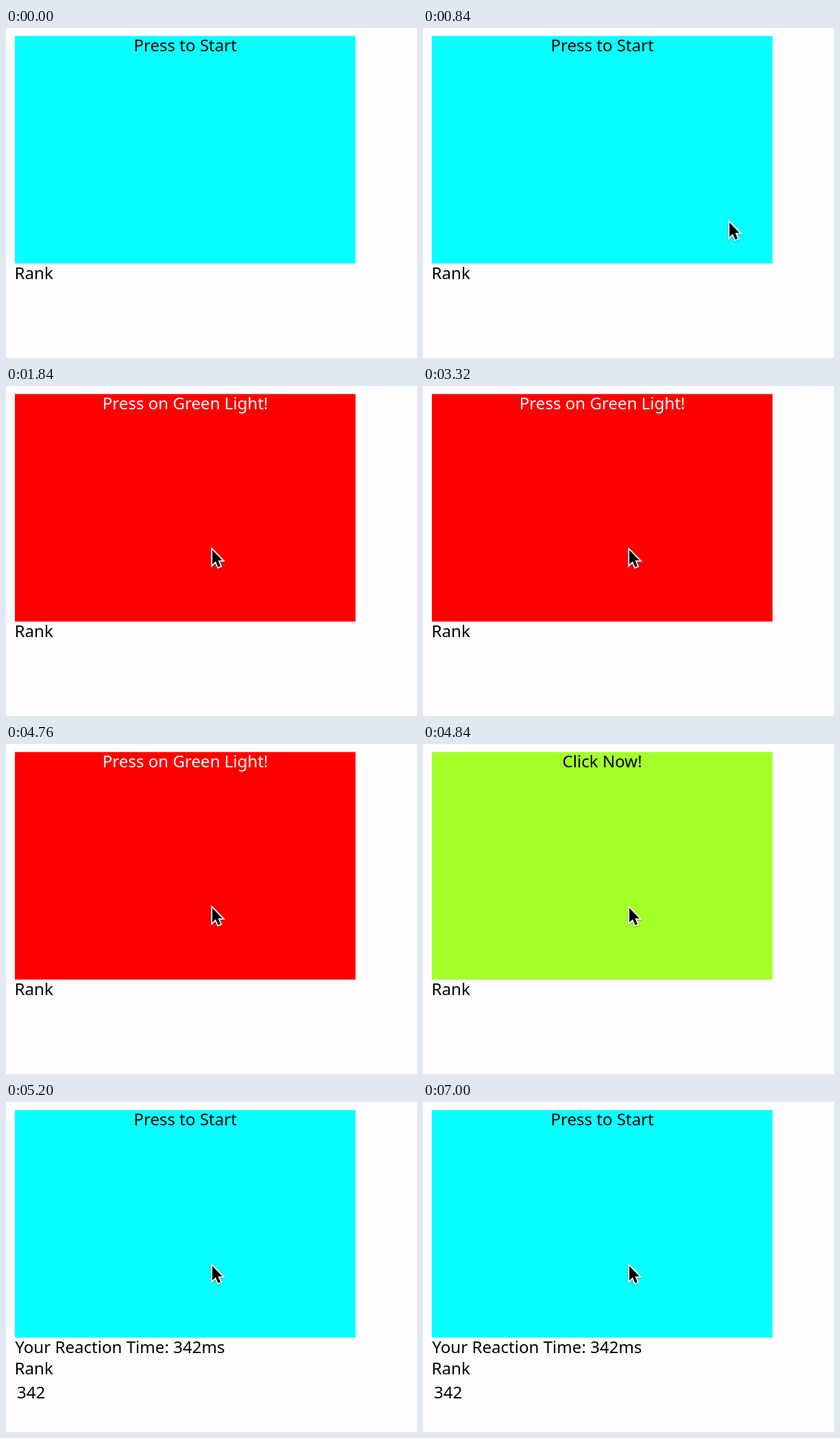
An HTML page for the animation above (7280 ms loop, 600 by 481 pixels).

```html
<!DOCTYPE html>
<html lang="en">
<head>
<meta charset="utf-8">
<title>Reaction test</title>
<style>
  html, body { margin: 0; width: 100%; height: 100%; overflow: hidden; background: #fffdff; }
  svg { display: block; width: 600px; height: 481px; }
  text { font: 24.1px "Noto Sans", sans-serif; }
  .title { text-anchor: middle; }

  .panel, .idle, .wait, .go, .before, .after { animation: 7280ms step-end infinite; }
  .panel { animation-name: panel; }
  .idle { animation-name: idle; }
  .wait { animation-name: wait; }
  .go { animation-name: go; }
  .before { animation-name: before; }
  .after { animation-name: after; }
  .cursor { animation: move 7280ms linear infinite, appear 7280ms step-end infinite; }

  /* 1840 ms = 25.2747%, 4840 ms = 66.4835%, 5200 ms = 71.4286% */
  @keyframes panel {
    0%, 71.4286% { fill: #08ffff; }
    25.2747% { fill: #ff0000; }
    66.4835% { fill: #a4ff28; }
  }
  @keyframes idle {
    0%, 71.4286% { visibility: visible; }
    25.2747% { visibility: hidden; }
  }
  @keyframes wait {
    0%, 66.4835% { visibility: hidden; }
    25.2747% { visibility: visible; }
  }
  @keyframes go {
    0%, 71.4286% { visibility: hidden; }
    66.4835% { visibility: visible; }
  }
  @keyframes before {
    0% { visibility: visible; }
    71.4286% { visibility: hidden; }
  }
  @keyframes after {
    0% { visibility: hidden; }
    71.4286% { visibility: visible; }
  }
  /* 760 ms = 10.4396%, 1160 ms = 15.9341% */
  @keyframes appear {
    0% { visibility: hidden; }
    10.4396% { visibility: visible; }
  }
  @keyframes move {
    0%, 10.4396% { transform: translate(571px, 321px); animation-timing-function: cubic-bezier(.2, .5, .4, 1); }
    15.9341%, 100% { transform: translate(301px, 239px); }
  }
</style>
</head>
<body>
<svg viewBox="0 0 600 481">
  <rect class="panel" x="13" y="11.7" width="497.3" height="331.7"/>
  <text class="title idle" x="261.7" y="34">Press to Start</text>
  <text class="title wait" x="261.7" y="34" fill="#fff">Press on Green Light!</text>
  <text class="title go" x="261.7" y="34">Click Now!</text>
  <text class="before" x="12.6" y="365.5">Rank</text>
  <g class="after">
    <text x="13.3" y="365.5">Your Reaction Time: 342ms</text>
    <text x="12.6" y="397">Rank</text>
    <text x="16" y="431.5">342</text>
  </g>
  <g class="cursor">
    <path d="M.2 0V21.3L5 16.5 8.7 25 12.2 23.5 8.5 15.2H15z" stroke="#fff" stroke-width="3.6"
          paint-order="stroke" style="filter: drop-shadow(0 1px 1px rgba(0,0,0,.35))"/>
  </g>
</svg>
</body>
</html>
```
